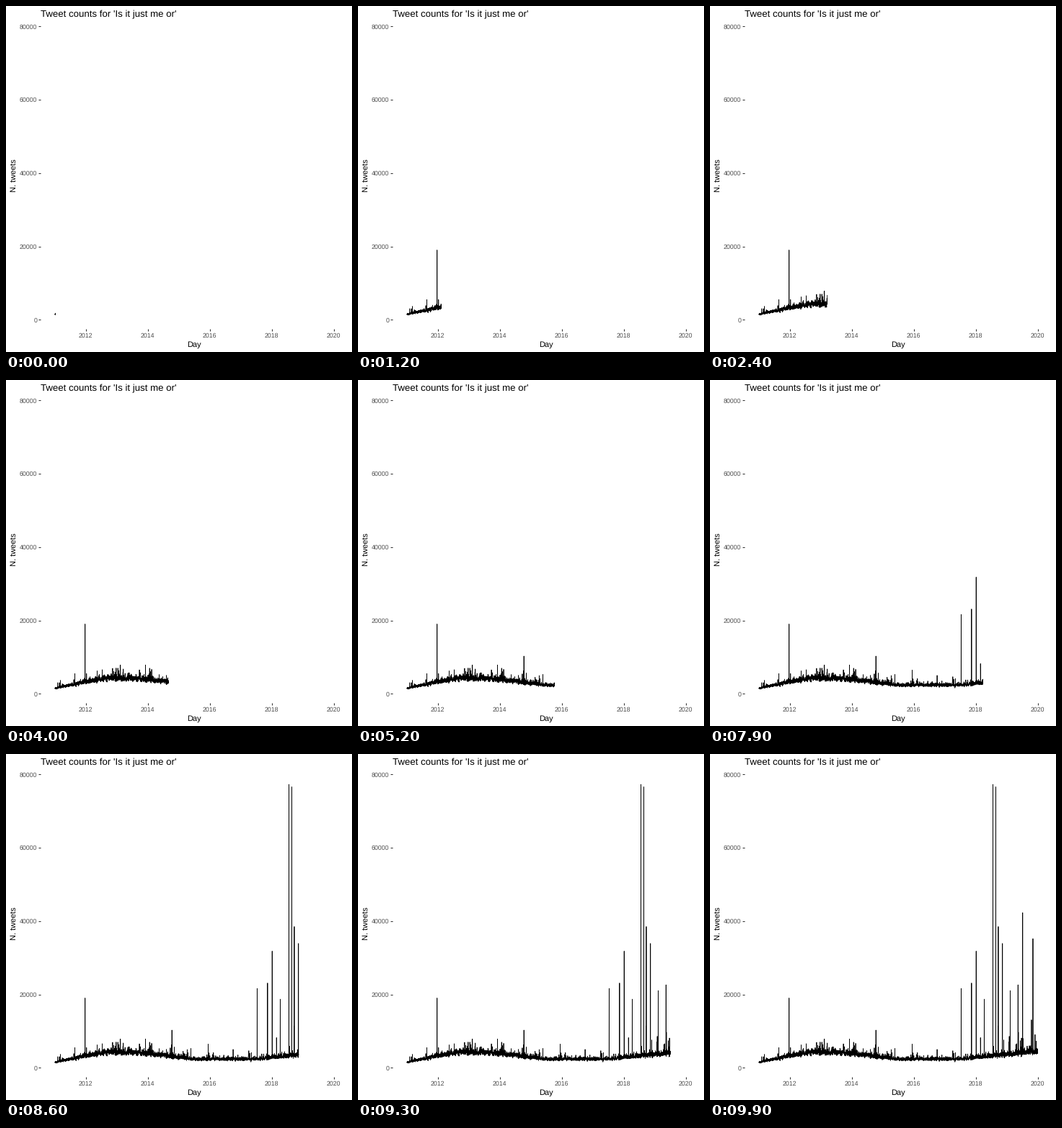
Recreate the animation shown at these times as a matplotlib script. Size 480x480 px, loop 10 s.

```python
import matplotlib.pyplot as plt
import numpy as np
from matplotlib.animation import FuncAnimation

SIZE, DPI = 480, 72
FRAMES, INTERVAL = 100, 100
START, END = 2011, 2020
LEFT, RIGHT, TOP, BOTTOM = 48, 474.5, 22, 448.2   # panel edges in pixels
X_2012, PX_PER_YEAR = 110.7, 43
Y_ZERO, PX_PER_COUNT = 435.2, 101.7 / 20000

plt.rcParams.update({
    "font.family": "Liberation Sans",
    "text.hinting": "none",
    "path.simplify": False,
})

# Slow trend of the usual daily count, and the few days that tower over it
TREND = {2011: 1500, 2012.6: 4300, 2013.8: 4100,
         2015.5: 2350, 2017.5: 2350, 2020: 4500}
PEAKS = {2011.977: 19000, 2017.525: 21600, 2017.862: 23100, 2018.012: 31800,
         2018.27: 18700, 2018.55: 77300, 2018.643: 76600, 2018.725: 38500,
         2018.86: 33900, 2019.108: 21000, 2019.362: 22600, 2019.51: 42300,
         2019.842: 35200}


def daily_counts():
    rng = np.random.default_rng(7)
    days = np.linspace(START, END, 3288)
    trend = np.interp(days, list(TREND), list(TREND.values()))
    counts = trend * rng.lognormal(0, 0.11, days.size)
    # Occasional bursts, growing stronger after 2018
    burst = 0.27 + 0.5 * np.clip(days - 2018, 0, 1)
    busy = rng.random(days.size) < 0.07
    counts *= 1 + busy * rng.exponential(burst)
    counts[np.searchsorted(days, list(PEAKS))] = list(PEAKS.values())
    return days, counts


def year_at(x):
    return 2012 + (x - X_2012) / PX_PER_YEAR


def count_at(y):
    return (Y_ZERO - y) / PX_PER_COUNT


def label(x, y, text, size, **kw):
    fig.text(x / SIZE, 1 - y / SIZE, text, size=size, color="black",
             va="baseline", **kw)


fig = plt.figure(figsize=(SIZE / DPI, SIZE / DPI), dpi=DPI, facecolor="white")
ax = fig.add_axes([LEFT / SIZE, 1 - BOTTOM / SIZE,
                   (RIGHT - LEFT) / SIZE, (BOTTOM - TOP) / SIZE])
ax.set_xlim(year_at(LEFT), year_at(RIGHT))
ax.set_ylim(count_at(BOTTOM), count_at(TOP))
years, levels = range(2012, 2021, 2), range(0, 80001, 20000)
ax.set_xticks(years, map(str, years))
ax.set_yticks(levels, map(str, levels))
ax.tick_params(length=2.75, width=1.07, color="#333333", pad=2.2,
               labelsize=8.8, labelcolor="#4d4d4d")
ax.spines[:].set_visible(False)
ax.patch.set_visible(False)

label(48, 15, "Tweet counts for 'Is it just me or'", 13.2)
label(261.25, 472.7, "Day", 11, ha="center")
label(13.5, 235.5, "N. tweets", 11, ha="center", rotation=90,
      rotation_mode="anchor")

days, counts = daily_counts()
line, = ax.plot([], [], color="black", lw=0.8, solid_capstyle="butt",
                solid_joinstyle="round")


def update(i):
    shown = np.searchsorted(days, START + 0.022 + 0.09122 * i, side="right")
    line.set_data(days[:shown], counts[:shown])
    return line,


anim = FuncAnimation(fig, update, frames=FRAMES, interval=INTERVAL,
                     repeat=True, repeat_delay=0)
plt.show()
```
